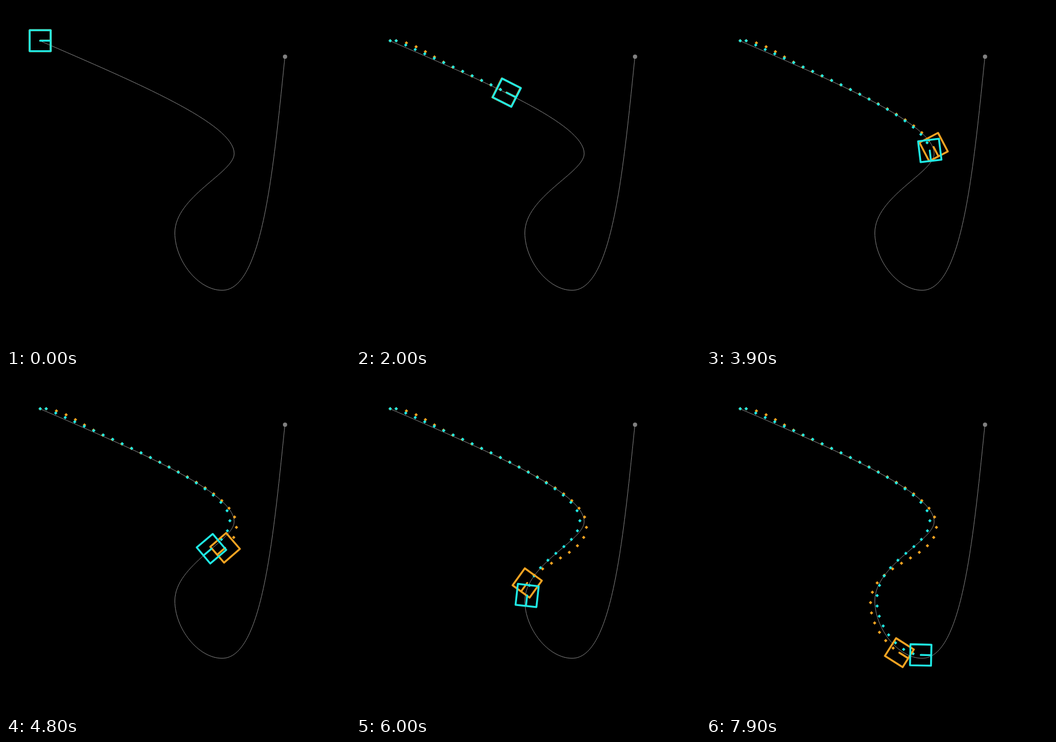
An HTML page for the animation above (8000 ms loop, 600 by 592 pixels).

```html
<!DOCTYPE html>
<html lang="en">
<head>
<meta charset="utf-8">
<title>Path following</title>
<style>
  html, body { margin: 0; width: 100%; height: 100%; overflow: hidden; background: #000; }
  svg { display: block; width: 100vw; height: 100vh; }
</style>
</head>
<body>
<svg id="stage" viewBox="0 0 600 592"></svg>
<script>
const LOOP = 8000, TICK = 100;
const CYAN = '#1fe9e4', ORANGE = '#f5a422', GREY = '#808080';
const FIRST_STEP = 10.5;   // the robots start from rest, so the first dot gap is short
const TRACK_STEPS = 39.04; // dot gaps along a whole track
const HALF = 18.3;         // half of a robot's side

const ROUTE = `M59 60.5 C229 134 398 205 398 257 S294.5 332 294.5 395
  C294.5 443 335 495 377 495 C447 495 466 288 486.5 88`.replace('S294.5', 'C398 290 294.5');
const CYAN_TRACK = `M59.6 60.4 H70 C229 134 390.5 201 390.5 255
  C390.5 305 298 321 298 395 C298 442 340 493 380 489`;
const ORANGE_TRACK = `M59.6 60.4 H70 C103 64 130 87 170 107 C285 160 402 214 402 264
  C402 326 287 326 287 400 C287 438 316 474 342 488`;

// Seconds and the dot gaps covered by then; the pace is even in between.
const PACE = [[0, 0], [2.7, 17.1], [4.8, 25.3], [6, 31], [7.9, 38.74]];

const stage = document.getElementById('stage');

function add(tag, attrs) {
  const node = document.createElementNS('http://www.w3.org/2000/svg', tag);
  for (const key in attrs) node.setAttribute(key, attrs[key]);
  return stage.appendChild(node);
}

function progress(seconds) {
  const k = Math.max(1, PACE.findIndex(([time]) => time >= seconds));
  const [t0, p0] = PACE[k - 1], [t1, p1] = PACE[k];
  return p0 + (p1 - p0) * (seconds - t0) / (t1 - t0);
}

function makeRunner(d, color) {
  const track = add('path', { d, fill: 'none' });
  const gap = (track.getTotalLength() - FIRST_STEP) / (TRACK_STEPS - 1);
  const distance = p => FIRST_STEP * Math.min(p, 1) + gap * Math.max(p - 1, 0);
  const dots = [];
  for (let i = 0; i < TRACK_STEPS; i++) {
    const { x, y } = track.getPointAtLength(distance(i));
    dots.push(add('path', { d: `M${x - 3} ${y}l3 -3l3 3l-3 3z`, fill: color }));
  }
  return { track, distance, dots, color };
}

function makeRobot(color) {
  return add('path', {
    d: `M${-HALF} ${-HALF}H${HALF}V${HALF}H${-HALF}ZM0 0H${HALF}`,
    fill: 'none', stroke: color, 'stroke-width': 3.3,
    'stroke-linejoin': 'round', 'stroke-linecap': 'round'
  });
}

add('rect', { width: 600, height: 592, fill: '#000' });
add('path', { d: ROUTE, fill: 'none', stroke: GREY, 'stroke-width': 1 });
add('circle', { cx: 486.7, cy: 88.3, r: 3.7, fill: GREY });

const runners = [makeRunner(ORANGE_TRACK, ORANGE), makeRunner(CYAN_TRACK, CYAN)];
for (const runner of runners) runner.robot = makeRobot(runner.color);

function render(ms) {
  const p = progress(Math.floor(ms / TICK) * TICK / 1000);
  for (const { track, distance, dots, robot } of runners) {
    const at = distance(p);
    const { x, y } = track.getPointAtLength(at);
    const back = track.getPointAtLength(at - 3), ahead = track.getPointAtLength(at + 3);
    const angle = Math.atan2(ahead.y - back.y, ahead.x - back.x) * 180 / Math.PI;
    robot.setAttribute('transform', `translate(${x} ${y}) rotate(${angle})`);
    dots.forEach((dot, i) => dot.setAttribute('visibility', i + 0.5 <= p ? 'visible' : 'hidden'));
  }
}

function loop() {
  render(performance.now() % LOOP);
  requestAnimationFrame(loop);
}
loop();
</script>
</body>
</html>
```
